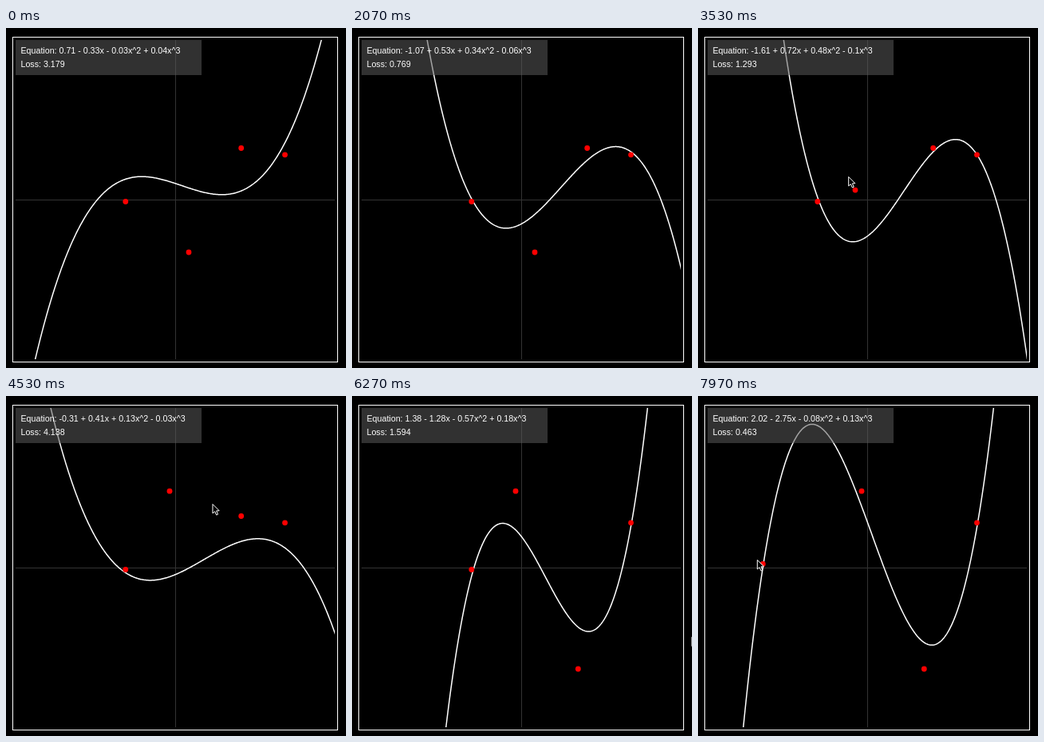
These frames come from a looping animation (426 by 426 pixels, 8000 ms). An HTML page with a canvas:

```html
<!DOCTYPE html>
<html lang="en">
<head>
<meta charset="utf-8">
<title>Cubic regression</title>
<style>
  html, body { margin: 0; width: 100%; height: 100%; overflow: hidden; background: #000; }
  canvas { display: block; width: 100vw; height: 100vh; }
</style>
</head>
<body>
<canvas id="stage" width="426" height="426"></canvas>
<script>
const ctx = document.getElementById('stage').getContext('2d');
const FRAME_MS = 100 / 3, FRAMES = 240;
const PLOT = { x: 12, y: 15, size: 400 };
const ORIGIN = { x: 212, y: 215 };
const UNIT = PLOT.size / 14;

// Times are in ticks of 1/30 s.
const FITS = [
  { at: 0, fit: [.71, -.33, -.032, .0369] },
  { at: 25, fit: [-.04, .26, .127, -.0175] },
  { at: 62, fit: [-1.07, .53, .337, -.0645] },
  { at: 106, fit: [-1.61, .72, .478, -.0983] },
  { at: 150, fit: [.3, .27, -.03, -.005] },
  { at: 164, fit: [.98, -.54, -.37, .1065] },
  { at: 215, fit: [1.82, -2.11, -.797, .258] },
  { at: 239, fit: [2.02, -2.75, -.084, .134] }
];
const POINTS = [[149.8, 217.5], [229, 281], [294.7, 150.5], [349.5, 158.8]];
const DRAGS = [
  { point: 1, start: 99, end: 113, via: [177, 206], to: [205, 119.2] },
  { point: 2, start: 150, end: 170, via: [254, 291], to: [283.3, 342] },
  { point: 0, start: 218, end: 239, via: [115, 214], to: [81.3, 210.5] }
];
DRAGS.forEach(drag => drag.from = POINTS[drag.point]);

// The pointer's way to each drag, the last one leading past the right edge.
const approach = (start, from, via, drag) => ({ start, end: drag.start, from, via, to: drag.from });
const APPROACHES = [
  approach(84, [-30, 250], [100, 265], DRAGS[0]),
  approach(DRAGS[0].end, DRAGS[0].to, [250, 135], DRAGS[1]),
  approach(DRAGS[1].end, DRAGS[1].to, [660, 290], DRAGS[2])
];

const clamp = u => Math.min(1, Math.max(0, u));
const smooth = u => u * u * (3 - 2 * u);

function glide({ start, end, from, via, to }, t, ease = u => u) {
  const u = ease(clamp((t - start) / (end - start))), w = 1 - u;
  return from.map((v, k) => v * w * w + 2 * via[k] * u * w + to[k] * u * u);
}

function coefficients(t) {
  const next = Math.max(1, FITS.findIndex(key => key.at >= t));
  const a = FITS[next - 1], b = FITS[next];
  const u = (t - a.at) / (b.at - a.at);
  return a.fit.map((v, k) => v + (b.fit[k] - v) * u);
}

function pointAt(index, t) {
  const drag = DRAGS.find(d => d.point === index);
  return drag ? glide(drag, t) : POINTS[index];
}

// A held point trails the pointer by one tick.
function cursorAt(t) {
  const drag = DRAGS.find(d => t >= d.start && t < d.end);
  const trip = APPROACHES.findLast(a => t >= a.start) || APPROACHES[0];
  const [x, y] = drag ? glide(drag, t + 1) : t >= DRAGS[2].end ? DRAGS[2].to : glide(trip, t, smooth);
  return [x - 7, y - 5];
}

const evaluate = ([a, b, c, d], x) => a + x * (b + x * (c + x * d));

function meanSquaredError(fit, points) {
  const errors = points.map(([px, py]) =>
    evaluate(fit, (px - ORIGIN.x) / UNIT) - (ORIGIN.y - py) / UNIT);
  return errors.reduce((sum, e) => sum + e * e, 0) / errors.length;
}

function equation(fit) {
  return fit.map((value, power) => {
    const v = Math.round(value * 100) / 100;
    if (power === 0) return String(v);
    return (v < 0 ? ' - ' : ' + ') + Math.abs(v) + 'x' + (power > 1 ? '^' + power : '');
  }).join('');
}

function drawGrid() {
  ctx.fillStyle = '#333';
  ctx.fillRect(ORIGIN.x, PLOT.y, 1, PLOT.size);
  ctx.fillRect(PLOT.x, ORIGIN.y, PLOT.size, 1);
  ctx.strokeStyle = '#fff';
  ctx.lineWidth = 1;
  ctx.strokeRect(8.5, 11.5, 407, 407);
}

function drawCurve(fit) {
  ctx.save();
  ctx.beginPath();
  ctx.rect(PLOT.x, PLOT.y, PLOT.size, PLOT.size);
  ctx.clip();
  ctx.beginPath();
  for (let px = PLOT.x - 1; px <= PLOT.x + PLOT.size + 1; px++) {
    ctx.lineTo(px, ORIGIN.y - UNIT * evaluate(fit, (px - ORIGIN.x) / UNIT));
  }
  ctx.strokeStyle = '#fff';
  ctx.lineWidth = 1.5;
  ctx.stroke();
  ctx.restore();
}

function drawPoint([x, y]) {
  ctx.beginPath();
  ctx.arc(x, y, 3.4, 0, 2 * Math.PI);
  ctx.fillStyle = '#f00';
  ctx.fill();
}

function drawPanel(fit, loss) {
  ctx.fillStyle = 'rgba(90, 90, 90, .55)';
  ctx.fillRect(12, 15, 233, 44);
  ctx.fillStyle = '#fff';
  ctx.font = '10.67px "Liberation Sans", Arial, sans-serif';
  ctx.fillText('Equation: ' + equation(fit), 18.5, 32);
  ctx.fillText('Loss: ' + Math.round(loss * 1000) / 1000, 18.5, 48.5);
}

function drawCursor([x, y]) {
  ctx.save();
  ctx.translate(x, y);
  const arrow = new Path2D('M0 0V11.5L2.7 9.2L4.7 13.6L6.6 12.7L4.7 8.4L8.2 8.2Z');
  ctx.fillStyle = '#000';
  ctx.fill(arrow);
  ctx.strokeStyle = '#fff';
  ctx.lineWidth = 1;
  ctx.stroke(arrow);
  ctx.restore();
}

function draw(t) {
  const fit = coefficients(t);
  const points = POINTS.map((_, i) => pointAt(i, t));
  ctx.fillStyle = '#000';
  ctx.fillRect(0, 0, 426, 426);
  drawGrid();
  drawCurve(fit);
  points.forEach(drawPoint);
  drawPanel(fit, meanSquaredError(fit, points));
  drawCursor(cursorAt(t));
}

function tick() {
  draw(Math.floor((performance.now() + 4) / FRAME_MS) % FRAMES);
  requestAnimationFrame(tick);
}
tick();
</script>
</body>
</html>
```
